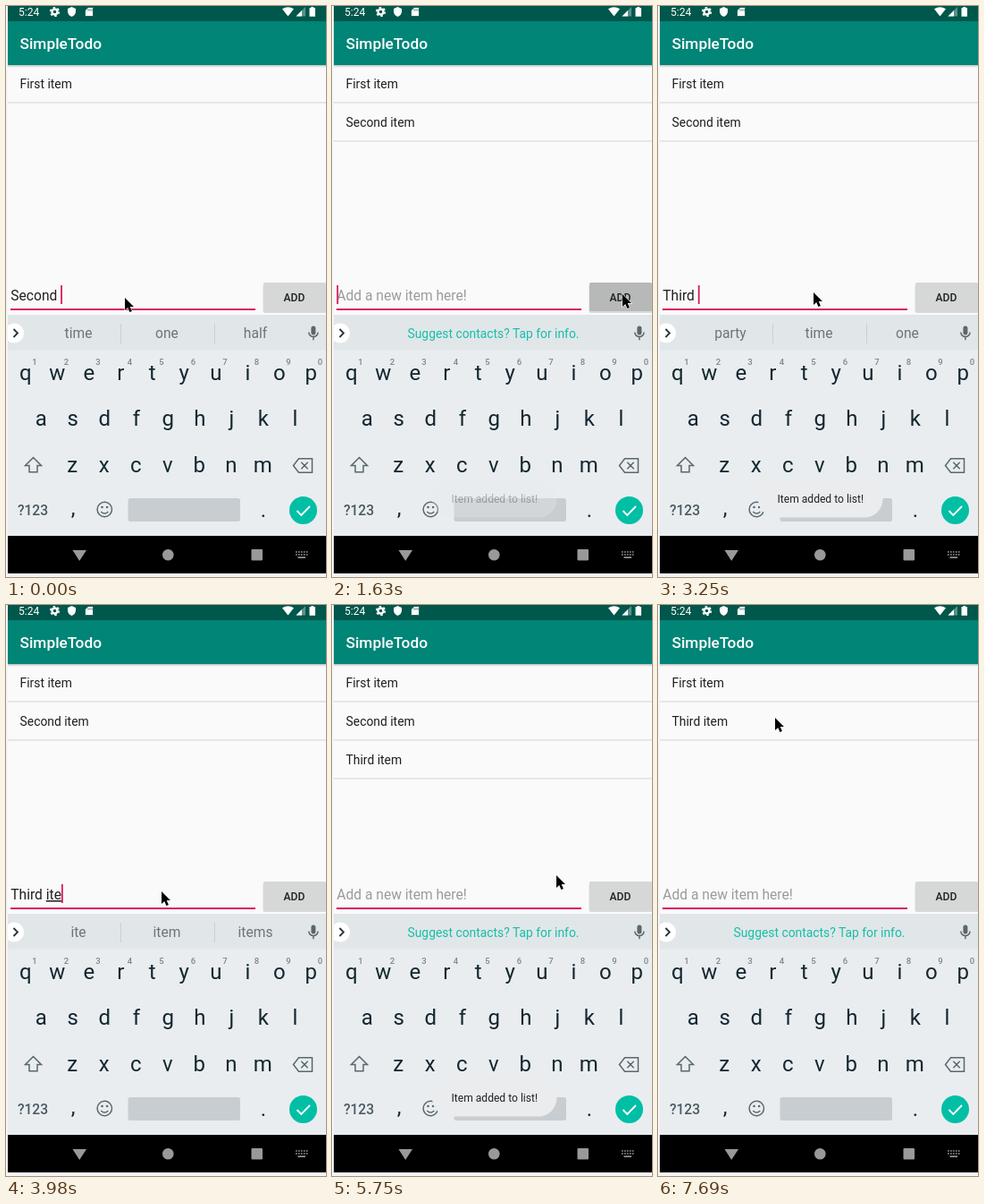
An HTML page that plays this animation: 358 by 638 pixels, repeating every 8000 ms.

```html
<!DOCTYPE html>
<html lang="en">
<head>
<meta charset="utf-8">
<title>SimpleTodo</title>
<style>
html, body { margin: 0; width: 100%; height: 100%; overflow: hidden; background: #f4f5f5; }
svg { display: block; width: 358px; height: 638px; font-family: Roboto, sans-serif; }
text { white-space: pre; }
.mid { text-anchor: middle; }
.item { font-size: 13.86px; fill: #1f1f1f; }
.word { font-size: 15.6px; fill: #6a757b; text-anchor: middle; }
.key { font-size: 24px; fill: #14272f; text-anchor: middle; }
.digit { font-size: 9.5px; font-weight: 500; fill: #7b868b; text-anchor: middle; }
.line { fill: none; stroke: #5a676d; stroke-width: 1.5; }
</style>
</head>
<body>
<svg viewBox="0 0 358 638">
  <defs>
    <linearGradient id="shade" x2="0" y2="1">
      <stop stop-opacity=".22"/><stop offset="1" stop-opacity="0"/>
    </linearGradient>
    <clipPath id="rowClip"><rect x="2" y="109" width="356" height="41.5"/></clipPath>
    <clipPath id="screen"><rect x="2" width="356" height="634"/></clipPath>
  </defs>
  <g clip-path="url(#screen)">
    <rect x="2" width="356" height="592" fill="#fafafa"/>

    <!-- list -->
    <circle id="ripple" cy="130" fill="#eaeaea" clip-path="url(#rowClip)"/>
    <g id="list"></g>

    <!-- app bar -->
    <rect x="2" y="66" width="356" height="3" fill="url(#shade)"/>
    <rect x="2" y="17" width="356" height="49" fill="#008577"/>
    <rect x="2" width="356" height="17" fill="#00574b"/>
    <text x="15.5" y="48" font-size="17.3" font-weight="500" fill="#fff">SimpleTodo</text>
    <g fill="#fff">
      <text x="14" y="11" font-size="12.1">5:24</text>
      <circle cx="54.5" cy="6.5" r="3" fill="none" stroke="#fff" stroke-width="2.4"/>
      <circle cx="54.5" cy="6.5" r="4.8" fill="none" stroke="#fff" stroke-width="1.6" stroke-dasharray="2.5 2.53"/>
      <path d="M73.5 1L78 3V6.5Q77.5 10.5 73.5 12Q69.5 10.5 69 6.5V3Z"/>
      <path d="M92 1.5H97.5V11.5H88.5V5ZM92 3.5V5.5M94 3.5V5.5M96 3.5V5.5" stroke="#00574b" stroke-width=".8"/>
      <path d="M309 3.3Q315.5-1 322 3.3L315.5 11.5Z"/>
      <path d="M335 1V11.5H324.5Z" fill-opacity=".35"/><path d="M331 5V11.5H324.5Z"/>
      <path d="M339.5 2H341.3V1H344.2V2H346V11.8H339.5Z"/>
    </g>

    <!-- input row -->
    <rect x="5" y="338" width="274" height="2" fill="#d81b60"/>
    <text id="input" x="5.3" y="329" font-size="15.6" fill="#212121"><tspan id="done"></tspan><tspan id="open" text-decoration="underline"></tspan></text>
    <text id="hint" x="5.3" y="329" font-size="15.6" fill="#9b9b9b">Add a new item here!</text>
    <rect id="caret" y="312" width="1.8" height="21" fill="#d81b60"/>
    <rect x="287.5" y="311" width="71" height="32" rx="2" fill="#000" opacity=".13"/>
    <rect id="button" x="288" y="309" width="70" height="32" rx="1.5"/>
    <text class="mid" x="322.5" y="329.5" font-size="12.1" font-weight="500" fill="#212121">ADD</text>

    <!-- keyboard -->
    <rect x="2" y="345" width="356" height="40" fill="#e1e6e9"/>
    <rect x="2" y="384.5" width="356" height="208" fill="#e9edf0"/>
    <circle cx="9" cy="365.5" r="11" fill="#fff"/>
    <path d="M8.5 361L13 365.5L8.5 370" fill="none" stroke="#26343a" stroke-width="1.8"/>
    <g id="words">
      <path d="M128.5 355V377M233.5 355V377" stroke="#c9d0d4"/>
      <text class="word" x="81" y="371"></text>
      <text class="word" x="180" y="371"></text>
      <text class="word" x="279" y="371"></text>
    </g>
    <text id="tip" class="mid" x="180.5" y="370.5" font-size="13.86" fill="#15bfa8">Suggest contacts? Tap for info.</text>
    <rect x="341.4" y="357.5" width="5" height="10" rx="2.5" fill="#5a676d"/>
    <path class="line" d="M338.8 364.5a5.1 5.1 0 0 0 10.2 0M343.9 370V373.3"/>
    <g id="keys"></g>
    <path class="line" d="M30.5 504.5L39.5 513.5H35V520.8H26V513.5H21.5Z"/>
    <path class="line" d="M327.5 505.8H342.5V521.2H327.5L321.5 513.5ZM330.3 509.8L337.7 517.2M337.7 509.8L330.3 517.2"/>
    <text class="mid" x="30" y="568.5" font-size="15.6" font-weight="500" fill="#4c5a61">?123</text>
    <text class="key" x="75" y="569">,</text>
    <text class="key" x="288" y="571">.</text>
    <circle class="line" cx="110.3" cy="562.5" r="8.2"/>
    <path class="line" d="M106.3 565q4 4.2 8 0"/>
    <circle cx="107.5" cy="560" r="1.3" fill="#5a676d"/><circle cx="113.1" cy="560" r="1.3" fill="#5a676d"/>
    <rect x="136.5" y="550" width="125.5" height="26" rx="2.5" fill="#c8cdd1"/>
    <circle cx="332.5" cy="563.5" r="15.5" fill="#00bfa5"/>
    <path d="M325.5 564L330.3 568.8L340 559" fill="none" stroke="#fff" stroke-width="1.9"/>

    <!-- navigation bar -->
    <rect x="2" y="592" width="356" height="42"/>
    <g fill="#999">
      <path d="M74.5 608H90L82.2 620Z"/>
      <circle cx="181.3" cy="613.2" r="6.3"/>
      <rect x="274.5" y="607" width="12.5" height="12.5" rx="1"/>
      <path d="M324 610H337.5M324 613H337.5" stroke="#999" stroke-width="1.7" stroke-dasharray="1.7 1.25"/>
      <path d="M326.5 616.2H335" stroke="#999" stroke-width="1.7"/>
    </g>

    <g id="toast">
      <rect x="112" y="530.5" width="139.5" height="41" rx="20.5" fill="#ebeced"/>
      <text class="mid" x="181.8" y="555" font-size="12.1" fill="#222">Item added to list!</text>
    </g>
  </g>
  <path id="mouse" d="M0 0V14L3.2 11L5.4 16L7.9 14.9L5.7 10.1H10Z" fill="#000" stroke="#fff" stroke-width="1.1" paint-order="stroke"/>
</svg>
<script>
const LOOP = 8000, STEP = 147.6;   // the screen refreshes once per STEP
const $ = id => document.getElementById(id);

const row = (letters, x, y) => [...letters].map((c, i) =>
  `<text class="key" x="${x + i * 35.5}" y="${y}">${c}</text>`).join('');
$('keys').innerHTML = row('qwertyuiop', 21.8, 417.5) + row('asdfghjkl', 39.3, 469) + row('zxcvbnm', 74.3, 520.5) +
  [...'1234567890'].map((c, i) => `<text class="digit" x="${32 + i * 35.5}" y="400.5">${c}</text>`).join('');

// [step, finished text, word being typed, suggestions]
const typing = [
  [0, 'Second ', '', 'time one half'],
  [1, 'Second ', 'ite', 'ite item items'],
  [2, 'Second ', 'item', 'item items itemized'],
  [11, '', '', ''],
  [17, '', 'T', 'T The To'],
  [18, '', 'Th', 'The This That'],
  [19, '', 'Thi', 'This Think Thing'],
  [20, '', 'Thir', 'Third Thirty Thirst'],
  [21, '', 'Third', 'Third Thirds Thirst'],
  [22, 'Third ', '', 'party time one'],
  [25, 'Third ', 'i', 'I in is'],
  [26, 'Third ', 'it', 'it is its'],
  [27, 'Third ', 'ite', 'ite item items'],
  [28, 'Third ', 'item', 'ite item items'],
  [29, 'Third ', 'item', 'item items itemized'],
  [36, '', '', '']
];
const lists = [[0, 'First'], [11, 'First', 'Second'], [36, 'First', 'Second', 'Third'], [51, 'First', 'Third']];
// [step, x, y], straight moves between
const path = [[4, 133, 326], [5, 150, 326], [7, 280, 324], [9, 324, 322], [11, 325, 322], [12, 228, 323],
  [13, 186, 321], [14, 174, 320], [30, 174, 320], [32, 309, 332], [33, 322, 327], [34, 325, 323], [36, 325, 323],
  [37, 292, 318], [38, 264, 309], [39, 251, 302], [43, 251, 302], [44, 240, 282], [46, 160, 158],
  [47, 134, 130], [48, 131, 126]];
const caretOff = [[6, 8], [14, 16], [32, 34], [39, 41], [45, 48], [52, 54]];
const ripples = { 47: [150, 50], 48: [180, 111.5], 49: [180, 160], 50: [180, 220], 51: [180, 220] };

const within = (n, a, b) => n >= a && n <= b;
const latest = (rows, n) => rows.filter(r => r[0] <= n).pop();

function pointer(n) {
  const a = latest(path, n) || path[0], b = path.find(p => p[0] > n) || a;
  const k = a === b ? 0 : Math.max(0, (n - a[0]) / (b[0] - a[0]));
  return [a[1] + (b[1] - a[1]) * k, a[2] + (b[2] - a[2]) * k];
}

function toastAlpha(n) {
  const age = n - (n < 36 ? 11 : 36);
  if (age < 0 || age > 15) return 0;
  return { 0: .3, 1: .75, 14: .75, 15: .3 }[age] || 1;
}

function draw(n) {
  const [, done, open, words] = latest(typing, n);
  $('done').textContent = done;
  $('open').textContent = open;
  $('hint').style.display = done + open ? 'none' : '';
  $('caret').setAttribute('x', done + open ? 5.3 + $('input').getComputedTextLength() : 5.3);
  $('caret').style.display = caretOff.some(([a, b]) => within(n, a, b)) ? 'none' : '';

  $('words').style.display = words ? '' : 'none';
  $('tip').style.display = words ? 'none' : '';
  const parts = words.split(' ');
  $('words').querySelectorAll('text').forEach((t, i) => t.textContent = parts[i] || '');

  $('list').innerHTML = latest(lists, n).slice(1).map((name, i) =>
    `<text class="item" x="15.6" y="${92 + i * 43}">${name} item</text>
     <rect x="2" y="${107 + i * 43}" width="356" height="1.8" fill="#e4e4e4"/>`).join('');

  const [cx, r] = ripples[n] || [180, 0];
  $('ripple').setAttribute('cx', cx);
  $('ripple').setAttribute('r', r);
  $('ripple').setAttribute('opacity', n === 51 ? .5 : 1);

  $('button').setAttribute('fill', within(n, 10, 11) || within(n, 35, 36) ? '#b7b8b8' : '#d6d7d7');
  $('toast').setAttribute('opacity', toastAlpha(n));
  $('mouse').setAttribute('transform', `translate(${pointer(n)})`);
}

let shown = -1;
function tick() {
  const n = Math.floor((performance.now() % LOOP + 8) / STEP);
  if (n !== shown) draw(shown = n);
  requestAnimationFrame(tick);
}
tick();
</script>
</body>
</html>
```
